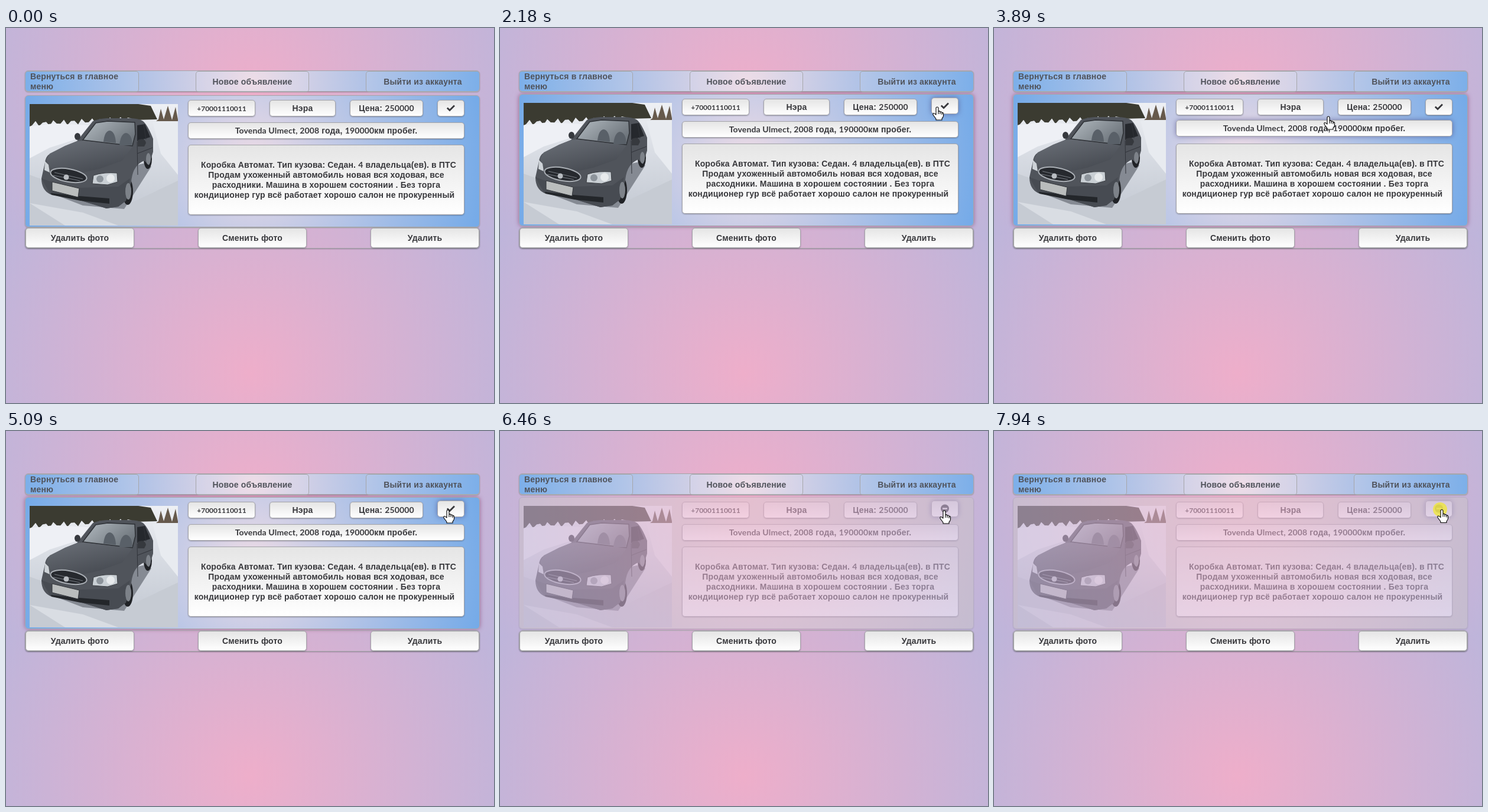
Write an HTML page that moves like this. It is 826 by 636 pixels and loops after 8000 ms.

```html
<!DOCTYPE html>
<html lang="ru">
<head>
<meta charset="utf-8">
<title>Объявление</title>
<style>
html, body { margin: 0; width: 100%; height: 100%; overflow: hidden; }
#stage {
  position: relative; width: 826px; height: 636px; overflow: hidden;
  font: bold 14px/17px "Liberation Sans", Arial, sans-serif; letter-spacing: .15px; color: #38383c;
  background: radial-gradient(circle 890px at 50% 50%, #eeaeca, #94bbe9) 0 -127px / 826px 475px;
}
#stage div { position: absolute; box-sizing: border-box; }
#stage .bar, #card, #stage .box {
  border: 1px solid #a6a6aa; border-radius: 6px; box-shadow: 0 1px 2px rgba(60, 60, 70, .4);
}
#stage .bar.blue, #card { background: radial-gradient(circle, #eddbe5, #74aae8); }
#stage .bar.blue { color: #50535b; }
#stage .box {
  display: flex; align-items: center; justify-content: center; text-align: center; white-space: nowrap;
  border-radius: 5px; background: linear-gradient(#e5e5e5, #fff);
}
#stage .box.clear { background: rgba(255, 255, 255, .06); box-shadow: none; }
#stage .box.left { justify-content: flex-start; text-align: left; padding-left: 8px; }
.box i { display: block; font-style: normal; position: relative; }
b { font-family: Lato, sans-serif; }
.phone b { font-size: 12px; letter-spacing: 0; }
#stage .hover { transform: translateY(-2px); }
#card.hover { box-shadow: 0 0 7px rgba(140, 75, 125, .75); }
#stage .box.hover { box-shadow: 0 0 8px rgba(70, 70, 130, .6); }
#card.off { opacity: .42; background: radial-gradient(circle, #dedede, #cbc8c5); }
#card.off.hover { box-shadow: 0 1px 2px rgba(60, 60, 70, .4); }
#photo { position: absolute; left: 7px; top: 14px; }
#over { position: absolute; left: 0; top: 0; }
.minus, .off .check { display: none; }
.off .minus { display: inline; }
</style>
</head>
<body>
<div id="stage">
  <div id="card">
    <svg id="photo" width="251" height="206" viewBox="0 0 251 206">
      <defs>
        <linearGradient id="snow" x2="0" y2="1">
          <stop offset="0" stop-color="#eef0f4"/><stop offset=".4" stop-color="#d9dde4"/><stop offset="1" stop-color="#c0c6d0"/>
        </linearGradient>
        <linearGradient id="hood" x2=".6" y2="1">
          <stop offset="0" stop-color="#6b7078"/><stop offset="1" stop-color="#474b52"/>
        </linearGradient>
        <linearGradient id="glass" x2="1" y2=".6">
          <stop offset="0" stop-color="#b3bbc1"/><stop offset="1" stop-color="#6d747b"/>
        </linearGradient>
      </defs>
      <rect width="251" height="206" fill="url(#snow)"/>
      <path id="trees" fill="#3b3b31"/>
      <path d="M218 26L222 8 227 26 234 3 241 27 247 5 251 26V29H214Z" fill="#66594c"/>
      <path d="M0 38L40 33 100 36 84 58 34 74 0 92Z" fill="#eef0f5"/>
      <path d="M208 30H251V120L222 84Z" fill="#e8ebf0"/>
      <path d="M0 120L22 128 60 160 150 178 251 130V206H0Z" fill="#c6cbd3"/>
      <path d="M0 168L90 184 150 206H60Z" fill="#d9dde3"/>
      <path d="M28 148L90 172 160 178 178 150 206 106 196 100 60 130Z" fill="#858a93"/>
      <ellipse cx="200" cy="93" rx="7" ry="17" fill="#202226"/>
      <ellipse cx="166" cy="148" rx="9" ry="23" fill="#202226"/>
      <path d="M107 29Q116 25 130 24H166Q185 24 192 29 200 36 209 59V81L202 104 194 96Q174 104 172 132L163 164 150 174 130 177 85 163 35 153Q20 146 20 126L26 99Q27 90 32 86L60 71 80 63Z" fill="#50545b"/>
      <path d="M80 63L92 62 174 72 157 96 118 110 90 116 34 108 28 95 34 84 60 71Z" fill="url(#hood)"/>
      <path d="M90 61L112 32 132 29 178 31 179 51 174 71Z" fill="url(#glass)" stroke="#2d3035" stroke-width="1.5"/>
      <path d="M152 70Q154 50 163 49 173 50 174 70ZM125 64Q127 45 136 45 145 47 146 66Z" fill="#596068"/>
      <path d="M182 36L195 34 204 56 182 63Z" fill="#25282d"/>
      <path d="M193 35L197 60M182 64L183 120M182 84L208 74" stroke="#303339" fill="none"/>
      <path d="M20 126L34 131 84 142 150 140 170 126 163 164 150 174 130 177 85 163 35 153Z" fill="#474b52"/>
      <path d="M36 151L84 156 135 160V169L86 164 37 154Z" fill="#23262a"/>
      <ellipse cx="66" cy="121" rx="31" ry="11" transform="rotate(10 66 121)" fill="#26292e" stroke="#a9aeb4" stroke-width="2"/>
      <path d="M42 116L90 127M40 121L85 130" stroke="#767b82"/>
      <circle cx="62" cy="124" r="4.5" fill="#b9bdc2"/>
      <path d="M108 121Q126 115 148 117L149 132 132 137 106 135Z" fill="#c9cfd4" stroke="#3a3d42"/>
      <circle cx="119" cy="127" r="6" fill="#8d949b"/><circle cx="137" cy="126" r="7" fill="#e7eaec"/>
      <path d="M26 97L32 103 34 116 25 112Z" fill="#cdd2d7"/>
      <path d="M38 132L84 143 82 158 38 147Z" fill="#babdbd" stroke="#33363b"/>
      <ellipse cx="81" cy="55" rx="5" ry="6" fill="#36393e"/>
      <path d="M183 61Q195 56 197 66L194 72 183 72Z" fill="#36393e"/>
      <ellipse cx="167" cy="148" rx="5" ry="14" fill="#7d8289"/>
      <ellipse cx="201" cy="93" rx="4" ry="10" fill="#7d8289"/>
    </svg>
  </div>
  <svg id="over" width="826" height="636">
    <circle id="click" r="12" fill="#efe63c" fill-opacity=".8"/>
    <g id="cursor" fill="#fff" stroke="#000" stroke-width="1.1" stroke-linejoin="round">
      <path id="hand" d="M-2 13V2Q-2 0 0 0T2 2V8Q3.500 5.800 5 8V9Q6.500 7 8 9V10.500Q10 8.500 10.500 11V15Q10 18 8 19.500V22H-2V20L-6.500 14Q-8 11 -6 10.500 -4.500 10.500 -2 13ZM2 8V12M5 9V12M8 10.500V13"/>
      <path id="arrow" d="M.5.500V16L4 12.700 6.500 18.500 9 17.500 6.500 11.800H11Z"/>
    </g>
  </svg>
</div>
<script>
const $ = id => document.getElementById(id);
const stage = $('stage'), card = $('card');
const CARD = [32, 114, 770, 224];

function place(el, [x, y, w, h], dx = 0, dy = 0) {
  Object.assign(el.style, { left: x - dx + 'px', top: y - dy + 'px', width: w + 'px', height: h + 'px' });
}
function add(parent, cls, rect, html = '', dx = 0, dy = 0) {
  const el = document.createElement('div');
  el.className = cls;
  el.innerHTML = html;
  place(el, rect, dx, dy);
  parent.insertBefore(el, parent === stage ? $('over') : null);
  return el;
}

place(card, CARD);
add(stage, 'bar blue', [32, 72, 770, 36]);
add(stage, 'bar', [32, 338, 770, 36]);
[['Вернуться в главное<br>меню', 32, 'left'], ['Новое объявление', 321, ''], ['Выйти из аккаунта', 609, '']]
  .forEach(([s, x, c]) => add(stage, 'bar blue box clear ' + c, [x, 73, x === 321 ? 192 : 193, 36], s));
[['Удалить фото', 33], ['Сменить фото', 325], ['Удалить', 617]]
  .forEach(([s, x]) => add(stage, 'box', [x, 339, 184, 34], s));

const about = [
  ['Коробка Автомат. Тип кузова: Седан. <b>4</b> владельца(ев). в ПТС', 4],
  ['Продам ухоженный автомобиль новая вся ходовая, все', 0],
  ['расходники. Машина в хорошем состоянии . Без торга', 0],
  ['кондиционер гур всё работает хорошо салон не прокуренный', -3]
].map(([s, x]) => `<i style="left:${x}px">${s}</i>`).join('');
const icon = `<svg width="16" height="16" viewBox="0 0 16 16">
  <path class="check" d="M1.800 7.500L6 11.500 14 3.500" fill="none" stroke="#38383c" stroke-width="2.800"/>
  <g class="minus"><circle cx="8" cy="7.500" r="7" fill="#38383c"/><path d="M4 7.500H12" stroke="#eee" stroke-width="2.400"/></g></svg>`;

const fields = [
  [[308, 122, 114, 28], '<b>+70001110011</b>', 'phone'],
  [[446, 122, 112, 28], 'Нэра'],
  [[582, 122, 124, 28], '<span>Цена: <b>250000</b></span>'],
  [[730, 122, 46, 28], icon],
  [[308, 160, 468, 28], '<span><b>Tovenda Ulmect, 2008</b> года, <b>190000</b>км пробег.</span>'],
  [[308, 198, 468, 119], `<span>${about}</span>`]
].map(([rect, html, cls = '']) => ({ rect, el: add(card, 'box ' + cls, rect, html, CARD[0] + 1, CARD[1] + 1) }));

// ragged tree line
let line = 'M0 0';
for (let x = 178; x >= 0; x -= 6) line = line.replace('M0 0', `M0 0H${x === 178 ? 178 : 184}`) && line + `L${x} ${34 - x * .05 + 5 * Math.sin(x * 1.7)}`;
$('trees').setAttribute('d', line.replace('M0 0', 'M0 0H184L205 3 216 26 178 27') + 'L0 38Z');

// start, end, steps, evenly timed waypoints
const moves = [
  [460, 1070, 10, [[800, 594], [790, 420], [765, 160], [745, 134]]],
  [2180, 2720, 9, [[740, 134], [640, 135], [500, 134], [380, 135], [335, 134]]],
  [2920, 3480, 9, [[338, 140], [400, 172], [445, 191], [469, 207], [520, 255]]],
  [3750, 3960, 4, [[545, 225], [562, 180], [566, 150], [563, 122]]],
  [4750, 4820, 2, [[680, 131], [748, 134]]],
  [5090, 5290, 3, [[748, 134]]],
  [6460, 6680, 4, [[752, 135], [772, 142], [788, 150], [900, 160]]],
  [7260, 7620, 6, [[811, 150], [790, 142], [772, 137], [764, 135], [760, 134], [758, 133.5]]]
];
const AWAY = [900, 700];

function along(pts, u) {
  const s = u * (pts.length - 1), i = Math.floor(s), a = pts[i], b = pts[i + 1] || a;
  return a.map((v, j) => v + (b[j] - v) * (s - i));
}
// current and preceding pointer position
function pointer(t) {
  const i = moves.findLastIndex(m => t >= m[0]);
  if (i < 0) return [AWAY, AWAY];
  const [t0, t1, n, pts] = moves[i];
  const k = Math.min(n - 1, Math.floor((t - t0) / (t1 - t0) * (n - 1) + .01));
  const before = k ? along(pts, (k - 1) / (n - 1)) : i ? moves[i - 1][3].at(-1) : AWAY;
  return [along(pts, k / (n - 1)), before];
}
const inside = ([x, y], [l, t, w, h]) => x >= l && x < l + w && y >= t && y < t + h;
const show = (el, on) => { el.style.display = on ? '' : 'none'; };

function draw(t) {
  const [now, before] = pointer(t);
  const off = t >= 5290;
  // hover follows one step late and resets after the reload
  const live = now[0] < 826 && !(off && t < 6460);
  card.classList.toggle('off', off);
  card.classList.toggle('hover', live && inside(before, CARD));
  fields.forEach(f => f.el.classList.toggle('hover', live && inside(before, f.rect)));
  const over = inside(now, CARD);
  show($('hand'), over);
  show($('arrow'), !over);
  $('cursor').setAttribute('transform', `translate(${now})`);
  $('click').setAttribute('transform', `translate(${now[0] - 3} ${now[1] - .5})`);
  show($('click'), t >= 7940 || (t >= 5170 && t < 5290));
}
const start = performance.now();
function tick() {
  draw((performance.now() - start) % 8000);
  requestAnimationFrame(tick);
}
tick();
</script>
</body>
</html>
```
